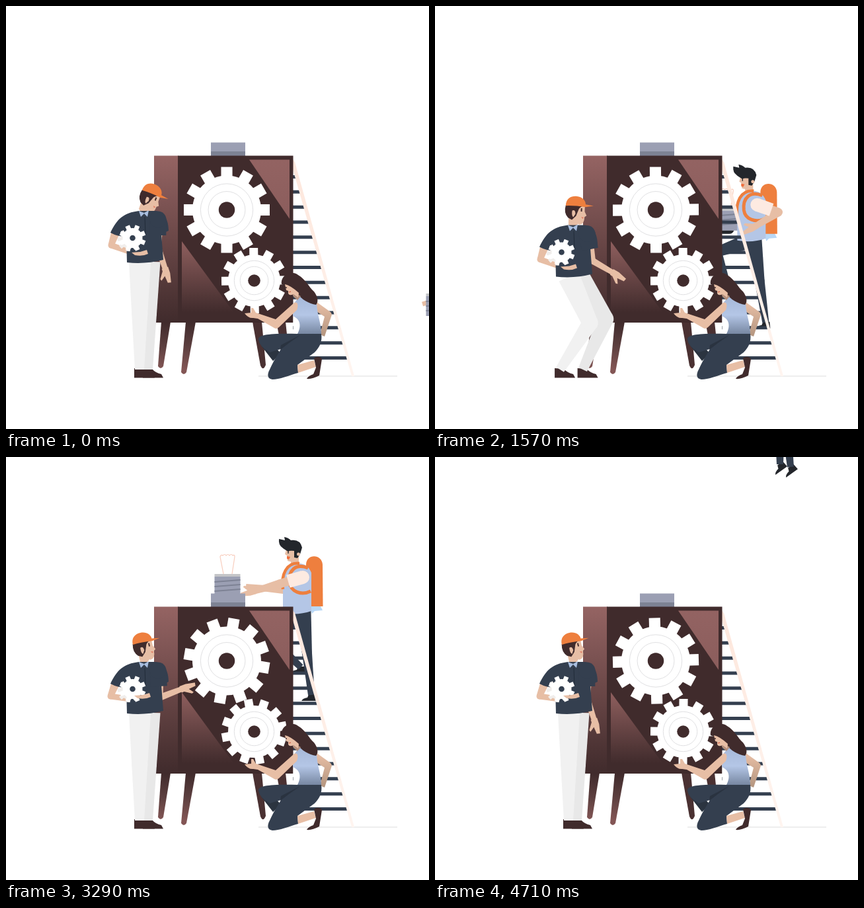
Write an HTML page with a canvas that moves like this. It is 640 px wide and 640 px high and loops after 4780 ms.

```html
<!DOCTYPE html>
<html lang="en">
<head>
<meta charset="utf-8">
<title>Building the idea machine</title>
<style>
html, body { margin: 0; width: 100%; height: 100%; overflow: hidden; background: #fff; }
canvas { display: block; width: 100vw; height: 100vh; }
</style>
</head>
<body>
<canvas id="stage" width="640" height="640"></canvas>
<script>
const ctx = document.getElementById('stage').getContext('2d');
const LOOP = 4780, STEP = 1000 / 14;
const NAVY = '#343f4f', BROWN = '#402b2c', SKIN = '#e7bea5', ORANGE = '#ee7f3e',
      BLUE = '#b4c6e6', PALE = '#fdeae1', STEEL = '#9b9fb3', SLATE = '#7d8294', INK = '#23262b';

// ---------- drawing helpers ----------
function fill(color, d) {
  ctx.fillStyle = color;
  ctx.fill(new Path2D(d));
}
function line(color, width, d) {
  ctx.strokeStyle = color;
  ctx.lineWidth = width;
  ctx.stroke(new Path2D(d));
}
function rect(color, x, y, w, h) {
  ctx.fillStyle = color;
  ctx.fillRect(x, y, w, h);
}
function disc(color, x, y, r) {
  ctx.fillStyle = color;
  ctx.beginPath();
  ctx.arc(x, y, r, 0, 7);
  ctx.fill();
}
function at(x, y, angle, draw) {
  ctx.save();
  ctx.translate(x, y);
  ctx.rotate(angle);
  draw();
  ctx.restore();
}
function fade(y0, y1, ...colors) {
  const g = ctx.createLinearGradient(0, y0, 0, y1);
  colors.forEach((c, i) => g.addColorStop(i / (colors.length - 1), c));
  return g;
}

// ---------- motion helpers ----------
const rad = degrees => degrees * Math.PI / 180;
const span = (n, a, b) => Math.min(1, Math.max(0, (n - a) / (b - a)));
const ramp = (n, a, b) => { const u = span(n, a, b); return u * u * (3 - 2 * u); };
const hold = (n, a, b, c, d) => ramp(n, a, b) - ramp(n, c, d);
const mix = (p, q, w) => p.map((v, i) => v + (q[i] - v) * w);

// ---------- limbs ----------
// Tapered chain of segments with round inner joints
function limb(color, points, widths) {
  for (let i = 0; i + 1 < points.length; i++) {
    const [ax, ay] = points[i], [bx, by] = points[i + 1];
    const len = Math.hypot(bx - ax, by - ay) || 1;
    const nx = (ay - by) / len / 2, ny = (bx - ax) / len / 2;
    const a = widths[i], b = widths[i + 1];
    ctx.fillStyle = color;
    ctx.beginPath();
    ctx.moveTo(ax + nx * a, ay + ny * a);
    ctx.lineTo(bx + nx * b, by + ny * b);
    ctx.lineTo(bx - nx * b, by - ny * b);
    ctx.lineTo(ax - nx * a, ay - ny * a);
    ctx.fill();
    if (i) disc(color, ax, ay, a / 2);
  }
}
// Middle joint of a two-bone limb; side 1 or -1 picks the way it bends
function joint([ax, ay], [bx, by], upper, lower, side) {
  const dx = bx - ax, dy = by - ay, d = Math.hypot(dx, dy);
  const along = (upper * upper - lower * lower + d * d) / (2 * d);
  const out = side * Math.sqrt(Math.max(0, upper * upper - along * along));
  return [ax + (dx * along + dy * out) / d, ay + (dy * along - dx * out) / d];
}
// Bare arm with hand; returns the elbow so that a sleeve can follow it
function arm(shoulder, goal, upper, lower, side, widths) {
  const d = Math.hypot(goal[0] - shoulder[0], goal[1] - shoulder[1]);
  const wrist = mix(shoulder, goal, Math.min(1, (upper + lower) / d));
  const elbow = joint(shoulder, wrist, upper, lower, side);
  limb(SKIN, [shoulder, elbow, wrist], widths);
  at(...wrist, Math.atan2(wrist[1] - elbow[1], wrist[0] - elbow[0]), () =>
    fill(SKIN, 'M-2,-5L8,-5L22,-2L21,3L10,4L15,11L12,12L2,5L-2,5Z'));
  return elbow;
}
function sleeve(color, shoulder, elbow, len, width) {
  const d = Math.hypot(elbow[0] - shoulder[0], elbow[1] - shoulder[1]);
  limb(color, [shoulder, mix(shoulder, elbow, len / d)], [width, width]);
  disc(color, ...shoulder, width / 2);
}

// ---------- scenery ----------
function gear(x, y, r, root, width, teeth, degrees, color = '#fff') {
  at(x, y, rad(degrees), () => {
    disc(color, 0, 0, root);
    for (let i = 0; i < teeth; i++) {
      rect(color, -width / 2, -r, width, r);
      ctx.rotate(2 * Math.PI / teeth);
    }
  });
}
function bigGear(x, y, r, degrees) {
  gear(x, y, r, r * 0.8, r * 0.263, 12, degrees);
  ctx.strokeStyle = '#e0e0e2';
  ctx.lineWidth = 1;
  for (const k of [0.61, 0.43]) {
    ctx.beginPath();
    ctx.arc(x, y, r * k, 0, 7);
    ctx.stroke();
  }
  disc(BROWN, x, y, r * 0.188);
}
function ladder() {
  for (let i = 0; i < 13; i++) {
    const y = 256 + i * 22.83, end = 437 + i * 6.5;
    fill(NAVY, `M434,${y}H${end}L${end + 1.5},${y + 5}H434Z`);
  }
  fill(fade(232, 560, '#fde6db', '#fff5f0'), 'M434,232L437,236L527,560L523,560L434,247Z');
}
function machine(n) {
  const wood = fade(479, 550, BROWN, '#5c3f3f', '#835655');
  fill(wood, 'M235,478H249L238,545Q234,551 230,545Z');
  fill(wood, 'M272,478H287L273,554Q269,560 265,554Z');
  fill('#4a3132', 'M373,478H387L393,543Q389,553 385,544Z');
  fill('#4a3132', 'M409,478H423L430,543L422,544Z');
  rect(STEEL, 310, 206.5, 52, 14);
  rect(SLATE, 310, 220, 52, 7);
  rect(fade(226, 479, '#956463', BROWN), 224, 226.5, 37, 252.5);
  rect(BROWN, 260, 226.5, 174.5, 252.5);
  fill(fade(232, 322, '#936362', '#8b5d5c'), 'M368,232.5H429V322Z');
  fill(fade(356, 464, '#8f5f5e', BROWN), 'M266,356V464H345Z');

  const turn = n * 5.43;
  bigGear(334, 308.5, 65, turn);
  bigGear(375.5, 415.5, 49.5, -1 - turn);
}

// ---------- kneeling woman ----------
function woman() {
  fill('#fff', 'M434.5,469L448,476L443,497H434.5Z');
  fill(fade(450, 500, SKIN, '#b3957f'), 'M466,445L491,463Q494,466 492,470L482,500L475,497L482,470L468,461Z');
  fill('#2b3440', 'M386,514L404,537L416,526L404,512Z');
  fill(NAVY, 'M382,505C380,497 402,495 441,496H477C479,508 474,517 467,524L441,543L442,555C428,559 414,565 403,565C395,564 395,557 399,550C405,537 410,529 416,519L399,524Q383,515 382,505Z');
  fill('#2a3340', 'M445,498L416,513L415,520L428,510Z');
  fill(SKIN, 'M441,543L466,536L469,546L442,555Z');
  fill(BROWN, 'M466,533C470,529 477,531 478,534L474,559Q463,565 455,564Q457,560 465,557L469,547Z');
  fill(fade(438, 497, '#a5b8d8', BLUE, '#75859f'), 'M434,451C440,447 442,438 446,437L470,450C471,468 477,480 477,496H441C447,485 446,474 434,469Z');
  fill(SKIN, 'M436,449C441,447 443,452 440,460L413,486Q409,490 404,486L381,473L374,472Q367,473 361,465L371,464V457H374L378,464L408,474Z');
  fill(BROWN, 'M417,421C415,407 432,399 442,407C454,414 458,425 466,432C472,440 473,448 469,452C459,451 446,443 442,436L425,424Z');
  fill('#b28f7c', 'M432,431L446,439L441,445L435,440Z');
  fill(SKIN, 'M422,421Q431,423 443,434L442,441L435,436Q429,439 427,435V431L424,430Z');
  line('#d4573e', 1.2, 'M428,433L431,432');
  disc(BROWN, 424, 426, 1);
}

// ---------- man with the cap ----------
function capHead() {
  fill(SKIN, 'M-6,-10H8V4Q0,11 -6,4Z');
  fill(SKIN, 'M-5,-26H18V-16L21,-10L18,-8Q18,4 10,4L-2,-4Z');
  fill(BROWN, 'M-11,-25H16Q9,-22 8,-17L5,-9L-1,-3L-7,-6Q-14,-13 -11,-25Z');
  fill(SKIN, 'M-1,-17Q4,-19 4,-12L1,-7Q-2,-9 -1,-17Z');
  fill(ORANGE, 'M-11,-24C-11,-35 -4,-39 4,-39C13,-39 19,-33 19,-27L31,-25L19,-23Q3,-25 -11,-24Z');
  rect(BROWN, 12, -21, 2, 5);
  fill('#e07a62', 'M13,-8L17,-7L15,-5Z');
}
function capMan(n) {
  const drop = 83 * hold(n, 0, 8, 17, 24.5);
  const tilt = 20 - 18 * ramp(n, 0, 8) - 15 * ramp(n, 22, 32);
  const raise = ramp(n, 32, 40);
  let reach = mix([241, 398], [293, 368], hold(n, 0, 8, 13, 32));
  reach = mix(reach, [266, 351], hold(n, 34, 44, 47, 53));

  const leg = (color, hip, foot) => {
    at(...foot, 0, () => fill(BROWN, 'M-8,-2L6,-1Q11,5 20,7L23,12.5H-8Z'));
    limb(color, [hip, joint(hip, foot, 77, 84, 1), foot], [33, 24, 14]);
  };
  leg('#e8e8e8', [217, 387 + drop], [215 + drop * 0.4, 550]);
  leg('#f1f1f1', [202.5, 388 + drop], [202 - drop * 0.6, 550]);

  at(0, drop, 0, () => {
    const elbow = arm([233, 325], reach, 39, 36, -1, [11, 10, 8]);
    limb(SKIN, [[166, 342], [159 - raise, 362], [193, 374 - raise * 7]], [13, 9, 8]);
    at(208, 305, rad(tilt), capHead);
    fill(NAVY, 'M201,310C178,313 168,322 158,343Q169,349 182,349L183,388Q211,391 238,384L235,345L246,340C246,323 239,311 226,310Z');
    sleeve(NAVY, [230, 323], elbow, 24, 25);
    fill('#a9bfe0', 'M201,310L209,313L216,309L214,319L209,314L204,319Z');
    line('#222c39', 1, 'M210,319L211,346');
    gear(186, 354, 17, 13, 6, 8, 5, '#f1eeec');
    gear(191.5, 351, 20, 15, 7, 8, 22);
    disc(NAVY, 191.5, 351, 4.3);
    at(203 + raise * 4, 373 - raise * 12, 0, () =>
      fill(SKIN, 'M-13,0L0,-1L10,-4L12,2Q4,6 -8,4Z'));
  });
}

// ---------- bulb and man with the jet pack ----------
function bulb(x, y, glow) {
  at(x, y, 0, () => {
    ctx.globalAlpha = glow;
    fill('#fdf8de', 'M-18,-17C-18,-32 -34,-38 -34,-55A34,34 0 0 1 34,-55C34,-38 18,-32 19,-17Z');
    ctx.globalAlpha = 1;
    const lit = glow > 0.5;
    line(lit ? '#eed9b7' : '#f8cdbd', 1.2,
      'M-6,-17L-11,-43Q-10,-47 -7,-45Q-4,-48 -2,-45Q1,-48 3,-45Q6,-48 8,-45Q11,-47 11,-43L7,-17');
    rect(lit ? '#cfc4a0' : '#c4c5c8', -19.5, -17, 39, 4);
    rect(STEEL, -19.5, -13, 39, 30);
    for (let y = -5; y < 15; y += 7) line(SLATE, 2, `M-19.5,${y}l39,-3`);
    fill(INK, 'M-12,17H12Q10,22 5,22H-5Q-10,22 -12,17Z');
  });
}
function climberHead() {
  fill(SKIN, 'M430,150H443V161Q437,166 431,161Z');
  fill(SKIN, 'M425,137L422,147L425,149L426,157Q430,159 434,157L441,152V137Z');
  fill(INK, 'M413,124L422,126L421,121Q427,122 431,126Q445,124 448,137L445,147L441,153L436,152V142Q429,141 427,143Q420,139 418,137Q412,133 413,124Z');
  disc(SKIN, 442.5, 147, 2.5);
  line(INK, 1.4, 'M427,142V146');
  fill('#f06d3c', 'M425,150L430,151L428,155L425,154Z');
}
function climber(n) {
  const climb = span(n, 17, 29.5), fly = span(n, 56, 66);
  const ox = 112 + 141 * (1 - span(n, 0, 10)) ** 2 - 121.5 * ramp(n, 10, 31) +
    9.5 * ramp(n, 32, 40) + 88 * Math.sin(2.1 * fly);
  const oy = 198 * (1 - climb) - 345 * fly ** 7;

  // The bulb goes from the arms to the socket, is screwed in, and comes back
  const placed = hold(n, 24, 29, 49, 54);
  const screwed = hold(n, 31, 40, 47, 50);
  const carried = mix([402, 204 + 50 * (1 - ramp(n, 0, 8))], [409.5, 194], ramp(n, 22, 30));
  const [bx, by] = mix(carried, [335 - ox, 184 + 10 * screwed - oy], placed);

  const cradle = mix([466, 253], [447, 214], ramp(n, 16, 22));
  const wrist = mix(cradle, [bx + 30, by + 12], placed);

  const stride = n < 10 ? 24 * Math.sin(n * Math.PI / 5) : 0;
  const step = Math.sin(Math.PI * span(n, 16, 29));
  let left = mix([435 + stride, 353], [446, 318], ramp(n, 16, 28));
  left = mix(left, [446, 356], ramp(n, 56, 61));
  left = [left[0] - 35 * step, left[1] - 25 * step];
  const right = mix([460 - stride, 353], [462, 360], ramp(n, 16, 22));

  at(ox, oy, 0, () => {
    if (n > 52) fill('#d5d8da', 'M463,235Q467,233 472,236L467,258Z');
    fill('#b9d8f6', 'M459,224H475L479,232L467,233L463,237Z');
    fill(ORANGE, 'M454,226V163C454,146 478,146 479,163L479.5,226Z');

    const leg = (hip, foot) => {
      at(...foot, rad(-36 * ramp(n, 56, 61)), () => fill(INK, 'M-4,-1H6L7,9H-15Q-13,5 -6,4Z'));
      limb(NAVY, [hip, joint(hip, foot, 60, 60, -1), foot], [25, 15, 10]);
    };
    leg([445, 234], left);
    leg([449 - 9 * (1 - climb), 234], right);

    limb(SKIN, [[436, 203], mix([bx + 14, by + 6], [bx + 28, by + 2], placed)], [12, 8]);
    if (placed < 0.2) at(bx - 20, by - 2, -0.3, () => rect(SKIN, -5, -4, 9, 7));
    bulb(bx, by, hold(n, 26, 28, 39, 41));
    fill(BLUE, 'M432,161C422,166 418,177 419,192V236Q442,240 462,233V175Q456,161 443,161Z');
    climberHead();
    line(ORANGE, 4.5, 'M444,161C424,159 416,178 419,200');
    line(ORANGE, 5, 'M457,168C438,160 427,172 429,190C431,204 447,210 461,203');
    const elbow = arm([448, 182], wrist, 35, 40, 1, [14, 13, 9]);
    sleeve(PALE, [449, 182], elbow, 23, 20);
  });
}

// ---------- loop ----------
function frame(now) {
  const n = Math.min(66, Math.floor((now % LOOP + 5) / STEP));
  rect('#fff', 0, 0, 640, 640);
  rect('#dedede', 382, 559.5, 210, 1);
  climber(n);
  ladder();
  machine(n);
  woman();
  capMan(n);
}
const start = performance.now();
function tick() {
  frame(performance.now() - start);
  requestAnimationFrame(tick);
}
tick();
</script>
</body>
</html>
```
